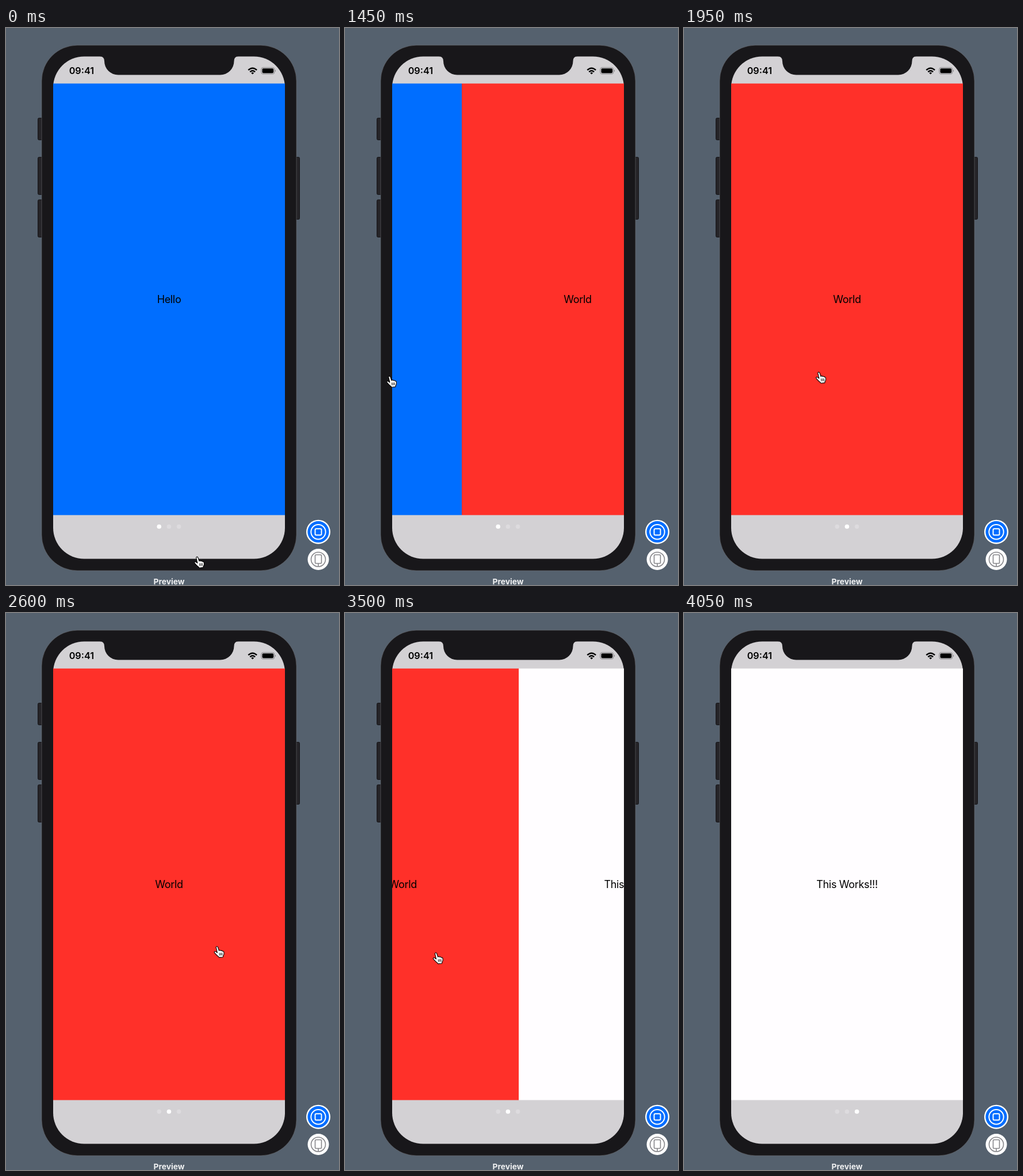
An HTML page that plays this animation: 579x968 px, repeating every 5000 ms.

```html
<!DOCTYPE html>
<html lang="en">
<head>
<meta charset="utf-8">
<title>Page view preview</title>
<style>
  html, body { margin: 0; width: 100%; height: 100%; overflow: hidden; background: #55616e; }
  svg { display: block; width: 579px; height: 968px; font-family: Inter, "Liberation Sans", sans-serif; }
  .page text { font-size: 18px; text-anchor: middle; letter-spacing: -.33px; }
  .key { fill: #252428; stroke: #151417; }
</style>
</head>
<body>
<svg viewBox="0 0 579 968">
  <defs>
    <clipPath id="window"><rect x="82" y="96.5" width="403" height="750"/></clipPath>
  </defs>

  <!-- Phone body -->
  <g class="key">
    <rect x="55.5" y="156.5" width="10" height="38" rx="2"/>
    <rect x="55.5" y="224.5" width="10" height="65" rx="2"/>
    <rect x="55.5" y="298.5" width="10" height="65" rx="2"/>
    <rect x="500.5" y="224.5" width="10" height="108" rx="2"/>
  </g>
  <rect x="62" y="30" width="443" height="913" rx="62" fill="#18171a" stroke="#6a6a6d" stroke-width=".6"/>
  <rect x="82" y="49.5" width="403" height="873" rx="54" fill="#d3d1d4"/>
  <path d="M163 49Q171 49.5 171 57.5A24 24 0 0 0 195 81.5H372.5A24 24 0 0 0 396.5 57.5Q396.5 49.5 404 49Z" fill="#18171a"/>

  <!-- Status bar -->
  <text x="109.7" y="80" font-size="16.2" font-weight="600">09:41</text>
  <g fill="none" stroke="#000" stroke-width="2.5">
    <path d="M421.3 73.2Q428.7 66.3 436.1 73.2"/>
    <path d="M424.3 76.3Q428.7 72.3 433.1 76.3"/>
  </g>
  <path d="M426.3 78.2Q428.7 76 431.1 78.2L428.7 80.6Z"/>
  <rect x="443.8" y="68.7" width="23" height="11.3" rx="3.2" fill="none" stroke="#858487"/>
  <rect x="445.5" y="70.3" width="19.7" height="8.1" rx="1.8"/>
  <path d="M468 72.5Q470.3 74.3 468 76.2Z" fill="#858487"/>

  <g clip-path="url(#window)"><g id="pages"></g></g>
  <g id="dots"></g>

  <text x="283.5" y="967" font-size="13.8" font-weight="700" text-anchor="middle" fill="#f0f1f2">Preview</text>

  <!-- Preview buttons -->
  <circle cx="543" cy="875.7" r="21" fill="#fff"/>
  <circle cx="543" cy="875.7" r="18.6" fill="#006eff"/>
  <g fill="none" stroke="#fff" stroke-width="2">
    <circle cx="543" cy="875.7" r="12.7"/>
    <rect x="537.5" y="870.2" width="11" height="11" rx="2"/>
  </g>
  <circle cx="543" cy="923.5" r="18.5" fill="#fff"/>
  <g fill="none" stroke="#858589" stroke-width="1.6">
    <circle cx="543" cy="923.5" r="12.5"/>
    <rect x="537.5" y="915.5" width="11" height="15" rx="1.5"/>
    <path d="M543 930.5V936"/>
  </g>

  <!-- Hand pointer, origin at the fingertip -->
  <g id="hand" stroke="#000" stroke-linejoin="round" stroke-linecap="round">
    <path fill="#fff" stroke-width="1.2" d="M-1.3 2C-1.5 -.2 1.3 -.6 2 1.5L4.2 8C4.8 6.6 7 6.9 7.5 8.2C8.3 7.2 10.2 7.7 10.5 9.2C11.6 8.6 13 9.4 13.2 11C13.7 13.6 13 16 11.8 17.5L11.5 19.8L4.3 20.5L2.8 18.5C.4 17.3 -1.8 14.3 -4 11.9C-5.6 10 -3.6 8.4 -1.8 9.7L.9 11.7Z"/>
    <path fill="none" d="M4.8 12.5L5.3 16.5M7.3 12.3L7.7 16.4M9.7 12.2L10 16.2"/>
  </g>
</svg>

<script>
const $ = id => document.getElementById(id);
const LOOP = 5000, STEP = 50, WIDTH = 403;
const SLOP = 22;    // pointer travel before a drag takes hold
const SETTLE = 43;  // decay time of the snap to the next page

const pages = [['#006eff', 'Hello'], ['#ff3029', 'World'], ['#fffdff', 'This Works!!!']];
$('pages').innerHTML = pages.map(([fill, label], i) =>
  `<g class="page" transform="translate(${82 + i * WIDTH})">
    <rect y="96" width="${WIDTH}" height="751" fill="${fill}"/>
    <text x="201.5" y="478">${label}</text></g>`).join('');
$('dots').innerHTML = pages.map((_, i) =>
  `<circle cx="${266.2 + i * 17.2}" cy="866.5" r="3.8"/>`).join('');

const swipes = [{ press: 1150, release: 1550 }, { press: 3400, release: 3550 }];

// Places where the pointer slows down
const stops = [
  { t: 200, x: 332, y: 919 }, { t: 1000, x: 380, y: 650 }, { t: 1150, x: 381, y: 634 },
  { t: 1450, x: 77, y: 605 }, { t: 1550, x: 75, y: 604 }, { t: 1950, x: 234, y: 598 },
  { t: 2250, x: 381, y: 577 }, { t: 2750, x: 362.5, y: 580 }, { t: 3400, x: 362.5, y: 580 },
  { t: 3550, x: 86, y: 594 }
];

const smooth = k => k * k * (3 - 2 * k);

function pointer(t) {
  const next = stops.findIndex(stop => stop.t > t);
  if (next < 1) return stops.at(next);
  const a = stops[next - 1], b = stops[next];
  const k = smooth((t - a.t) / (b.t - a.t));
  return { x: a.x + (b.x - a.x) * k, y: a.y + (b.y - a.y) * k };
}

// Follows the pointer while pressed, then decays towards a full page
function swiped({ press, release }, t) {
  if (t < press) return 0;
  const drag = Math.max(0, pointer(press).x - pointer(Math.min(t, release)).x - SLOP);
  return WIDTH - (WIDTH - drag) * Math.exp(-Math.max(0, t - release) / SETTLE);
}

function draw(t) {
  const offset = swipes.reduce((sum, swipe) => sum + swiped(swipe, t), 0);
  $('pages').setAttribute('transform', `translate(${-offset})`);

  const current = swipes.filter(swipe => t > swipe.release).length;
  [...$('dots').children].forEach((dot, i) =>
    dot.setAttribute('fill', i === current ? '#fff' : '#dddbde'));

  const { x, y } = pointer(t);
  $('hand').setAttribute('transform', `translate(${x} ${y}) scale(.94)`);
  $('hand').setAttribute('visibility', current < 2 ? 'visible' : 'hidden');
}

const start = performance.now();
function tick() {
  const t = (performance.now() - start) % LOOP;
  draw(Math.floor(t / STEP) * STEP);
  requestAnimationFrame(tick);
}
tick();
</script>
</body>
</html>
```
